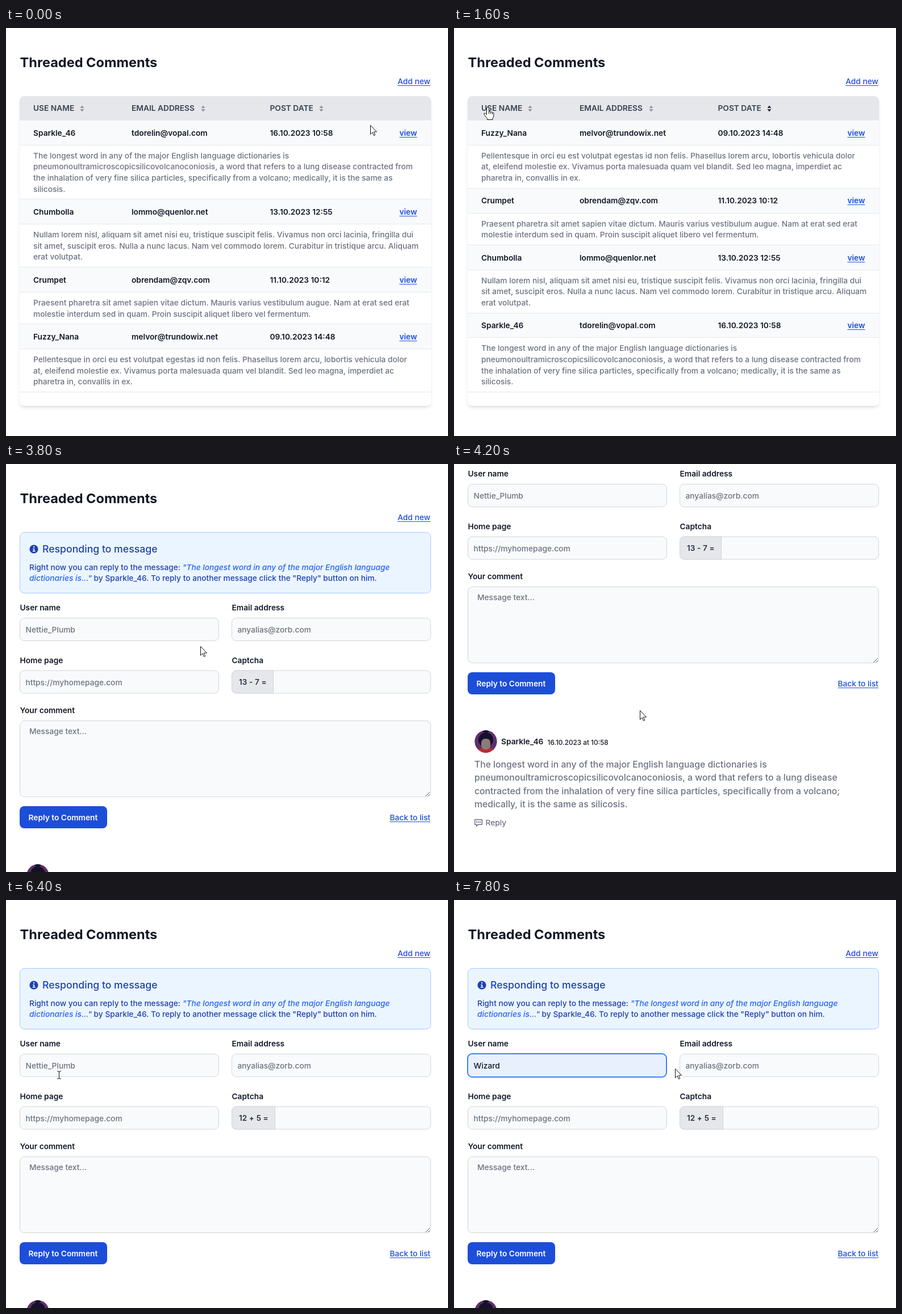
These frames come from a looping animation (778 px wide and 719 px high, 8000 ms). An HTML page with a canvas:

```html
<!DOCTYPE html>
<html lang="en">
<head>
<meta charset="utf-8">
<title>Threaded Comments</title>
<style>
html, body { margin: 0; width: 100%; height: 100%; overflow: hidden; background: #fff; }
canvas { display: block; }
</style>
</head>
<body>
<canvas id="stage" width="778" height="719"></canvas>
<script>
const ctx = document.getElementById('stage').getContext('2d');
const LOOP = 8000, STEP = 200;
const ZOOM = 0.982;              // page zoom applied to the type sizes
const LINE = 20 * ZOOM;
const INK = '#111827', GRAY = '#6b7280', RULE = '#e5e7eb', EDGE = '#d1d5db',
      PALE = '#f9fafb', LINK = '#1d4ed8', NAVY = '#1e40af';

const rows = [
  { user: 'Sparkle_46', mail: 'tdorelin@vopal.com', date: '16.10.2023 10:58', body: [
    'The longest word in any of the major English language dictionaries is',
    'pneumonoultramicroscopicsilicovolcanoconiosis, a word that refers to a lung disease contracted from',
    'the inhalation of very fine silica particles, specifically from a volcano; medically, it is the same as',
    'silicosis.'] },
  { user: 'Chumbolla', mail: 'lommo@quenlor.net', date: '13.10.2023 12:55', body: [
    'Nullam lorem nisl, aliquam sit amet nisi eu, tristique suscipit felis. Vivamus non orci lacinia, fringilla dui',
    'sit amet, suscipit eros. Nulla a nunc lacus. Nam vel commodo lorem. Curabitur in tristique arcu. Aliquam',
    'erat volutpat.'] },
  { user: 'Crumpet', mail: 'obrendam@zqv.com', date: '11.10.2023 10:12', body: [
    'Praesent pharetra sit amet sapien vitae dictum. Mauris varius vestibulum augue. Nam at erat sed erat',
    'molestie interdum sed in quam. Proin suscipit aliquet libero vel fermentum.'] },
  { user: 'Fuzzy_Nana', mail: 'melvor@trundowix.net', date: '09.10.2023 14:48', body: [
    'Pellentesque in orci eu est volutpat egestas id non felis. Phasellus lorem arcu, lobortis vehicula dolor',
    'at, eleifend molestie ex. Vivamus porta malesuada quam vel blandit. Sed leo magna, imperdiet ac',
    'pharetra in, convallis in ex.'] }
];

const thread = [
  'The longest word in any of the major English language dictionaries is',
  'pneumonoultramicroscopicsilicovolcanoconiosis, a word that refers to a lung disease',
  'contracted from the inhalation of very fine silica particles, specifically from a volcano;',
  'medically, it is the same as silicosis.'
];

// time, x, y, pointer shape
const path = [
  [0, 641, 171, 'arrow'], [400, 580, 150, 'hand'], [600, 558, 141, 'hand'], [1200, 560, 141, 'hand'],
  [1400, 330, 142, 'hand'], [1600, 59, 139, 'hand'], [1800, 27, 141, 'hand'], [2000, 75, 141, 'hand'],
  [2200, 132, 140, 'hand'], [2400, 134, 140, 'hand'], [2600, 410, 180, 'arrow'], [2800, 610, 184, 'arrow'],
  [3000, 708, 184, 'hand'], [3400, 700, 190, 'arrow'], [3600, 480, 280, 'arrow'], [3800, 342, 321, 'arrow'],
  [4200, 327, 434, 'arrow'], [4400, 210, 540, 'arrow'], [4600, 75, 630, 'hand'], [4800, 68, 632, 'hand'],
  [5200, 68, 630, 'arrow'], [5600, 82, 520, 'text'], [6000, 96, 376, 'text'], [6400, 93, 308, 'text'],
  [6600, 94, 296, 'text'], [6800, 95, 306, 'text'], [7000, 100, 340, 'arrow'], [7400, 105, 342, 'arrow'],
  [7600, 255, 318, 'arrow'], [7800, 389, 297, 'arrow'], [8000, 389, 297, 'arrow']
];

// start, end, x, y of each click mark
const clicks = [
  [800, 1200, 555, 140], [2400, 2800, 134, 140], [3200, 3400, 708, 185],
  [4800, 5200, 68, 632], [6600, 6800, 94, 294], [7200, 7400, 102, 341]
];

const shapes = {
  arrow: new Path2D('M0 0V15.8L3.6 12.4L6 18L8.3 17L5.9 11.5H11Z'),
  hand: new Path2D('M-2 2Q-2 0 0 0T2 2V8Q4.2 6.7 5 8.7Q7.2 7.6 8 9.7Q10.5 8.8 10.5 11.5V15Q10.3 18 8.5 19.5V22H-1V20L-6.2 13.6Q-7.6 10.6 -5 10.4L-2 13Z'),
  knuckles: new Path2D('M2 8V12M5 8.7V12M8 9.7V12.5'),
  text: new Path2D('M-3.5 -6.5H-1Q0 -6.5 0 -5.5Q0 -6.5 1 -6.5H3.5M0 -5.5V5.5M-3.5 6.5H-1Q0 6.5 0 5.5Q0 6.5 1 6.5H3.5'),
  bubble: new Path2D('M.7 .7H13.3V9.3H6.5L3.5 12.3V9.3H.7Z')
};

function setFont(size, weight, style = '') {
  ctx.font = `${style} ${weight} ${size * ZOOM}px Inter, sans-serif`;
}

// Draws a line of text and returns its width.
function text(str, x, y, { size = 14, weight = 500, color = INK, align = 'left', style } = {}) {
  setFont(size, weight, style);
  ctx.fillStyle = color;
  ctx.textAlign = align;
  ctx.fillText(str, x, Math.round(y));
  return ctx.measureText(str).width;
}

function link(str, right, y, weight = 500) {
  const w = text(str, right, y, { weight, color: LINK, align: 'right' });
  ctx.fillRect(right - w, Math.round(y) + 2, w, 1);
}

function box(x, y, w, h, r, fill, stroke, line = 1) {
  const d = stroke ? line / 2 : 0;
  ctx.beginPath();
  ctx.roundRect(x + d, y + d, w - 2 * d, h - 2 * d, r);
  ctx.fillStyle = fill;
  ctx.fill();
  if (!stroke) return;
  ctx.lineWidth = line;
  ctx.strokeStyle = stroke;
  ctx.stroke();
}

function disc(x, y, r, fill) {
  ctx.beginPath();
  ctx.arc(x, y, r, 0, 7);
  ctx.fillStyle = fill;
  ctx.fill();
}

function poly(fill, ...pts) {
  ctx.beginPath();
  pts.forEach(([x, y]) => ctx.lineTo(x, y));
  ctx.fillStyle = fill;
  ctx.fill();
}

function shadow(x, y, w, h, dy, blur, spread) {
  ctx.save();
  ctx.shadowColor = 'rgba(0,0,0,.1)';
  ctx.shadowOffsetY = dy;
  ctx.shadowBlur = blur;
  box(x - spread, y - spread, w + 2 * spread, h + 2 * spread, 7, '#fff');
  ctx.restore();
}

function sortIcon(x, active) {
  const c = active ? '#1f2937' : '#8f949e';
  poly(c, [x - 3.5, 141], [x, 136.5], [x + 3.5, 141]);
  poly(c, [x - 3.5, 143], [x, 147.5], [x + 3.5, 143]);
}

function heading() {
  text('Threaded Comments', 24.5, 69, { size: 24, weight: 700 });
  link('Add new', 747, 99);
}

function table(order, active) {
  shadow(24, 120, 724, 546, 4, 6, -1);
  shadow(24, 120, 724, 546, 2, 4, -2);
  ctx.save();
  ctx.beginPath();
  ctx.roundRect(24, 120, 724, 546, 8);
  ctx.clip();
  box(24, 120, 724, 546, 0, '#fff');
  box(24, 120, 724, 43, 0, RULE);
  [['USE NAME', 48, 134], ['EMAIL ADDRESS', 221, 347], ['POST DATE', 464.5, 555]].forEach(([name, x, icon], i) => {
    text(name, x, 146, { weight: 600, color: '#374151' });
    sortIcon(icon, i === active);
  });
  let y = 163;
  for (const i of order) {
    const { user, mail, date, body } = rows[i];
    const mid = y + 43.8, end = mid + 17 + body.length * LINE;
    const top = Math.round(y), split = Math.round(mid);
    box(24, top, 724, split - top, 0, PALE);
    [[user, 48], [mail, 221], [date, 464.5]].forEach(([s, x]) => text(s, x, y + 26.7, { weight: 600 }));
    link('view', 723.5, y + 26.7, 600);
    body.forEach((s, n) => text(s, 48, mid + 23 + n * LINE, { color: GRAY }));
    box(24, split - 1, 724, 1, 0, RULE);
    box(24, Math.round(end) - 1, 724, 1, 0, RULE);
    y = end;
  }
  ctx.restore();
}

function notice() {
  box(24, 120, 724, 108, 8, '#ebf5ff', '#a4cafe');
  disc(49, 150, 7.6, NAVY);
  ctx.fillStyle = '#fff';
  ctx.fillRect(48, 145, 2.2, 2.2);
  ctx.fillRect(47, 149, 3, 1.4);
  ctx.fillRect(48.5, 149, 1.6, 5);
  ctx.fillRect(46.8, 153, 5, 1.4);
  text('Responding to message', 64, 156, { size: 18, color: NAVY });
  const quote = { color: '#2563eb', style: 'italic' };
  const lead = text('Right now you can reply to the message: ', 41, 187, { color: NAVY });
  text('"The longest word in any of the major English language', 41 + lead, 187, quote);
  const tail = text('dictionaries is..."', 41, 206, quote);
  text(` by ${rows[0].user}. To reply to another message click the "Reply" button on him.`, 41 + tail, 206, { color: NAVY });
}

function field(label, hint, x, y, w = 351) {
  text(label, x + .5, y - 13, { weight: 600 });
  box(x, y, w, 41, 8, PALE, EDGE);
  text(hint, x + 10.5, y + 26, { color: GRAY });
}

function captcha(sum) {
  field('Captcha', '', 397, 363.5);
  setFont(14, 500);
  const w = Math.round(ctx.measureText(sum).width) + 25;
  box(397, 363.5, w, 41, [8, 0, 0, 8], RULE, EDGE);
  text(sum, 410, 389);
}

function avatar(x, y) {
  ctx.save();
  ctx.beginPath();
  ctx.arc(x, y, 19.7, 0, 7);
  ctx.clip();
  disc(x, y, 20, '#5f2f6c');
  box(x - 14, y + 12, 28, 10, 6, '#b92d2f');
  disc(x, y - 3, 13, '#15112a');
  box(x - 8, y - 5, 16, 19, 7, '#8d7b78');
  box(x - 5, y - 20, 10, 4, 2, '#15112a');
  ctx.restore();
}

function comment() {
  avatar(56, 725);
  text(rows[0].user, 83, 730, { weight: 600 });
  text('16.10.2023 at 10:58', 164.5, 731, { size: 12 });
  thread.forEach((s, n) => text(s, 36, 770.5 + n * 24 * ZOOM, { size: 16, color: GRAY }));
  ctx.save();
  ctx.translate(36, 862);
  ctx.lineWidth = 1.4;
  ctx.strokeStyle = ctx.fillStyle = GRAY;
  ctx.stroke(shapes.bubble);
  for (const x of [3, 6, 9]) ctx.fillRect(x, 4, 2, 2);
  ctx.restore();
  text('Reply', 55.5, 873, { color: GRAY });
}

function form(t) {
  const scroll = t < 4000 || t >= 5200 ? 0 : t < 4200 ? 118 : 236;
  ctx.save();
  ctx.translate(0, -scroll);
  heading();
  notice();
  field('User name', t < 7000 ? 'Nettie_Plumb' : '', 24, 271);
  field('Email address', 'anyalias@zorb.com', 397, 271);
  field('Home page', 'https://myhomepage.com', 24, 363.5);
  captcha(t < 5200 ? '13 - 7 =' : '12 + 5 =');
  text('Your comment', 24.5, 439, { weight: 600 });
  box(24, 452, 724, 135, 8, PALE, EDGE);
  text('Message text...', 41, 475.5, { color: GRAY });
  ctx.beginPath();
  ctx.moveTo(738.5, 585.5); ctx.lineTo(746, 578);
  ctx.moveTo(743, 585.5); ctx.lineTo(746, 582.5);
  ctx.strokeStyle = '#555';
  ctx.lineWidth = 1;
  ctx.stroke();
  box(24, 603, 154, 39, 8, LINK);
  text('Reply to Comment', 39.5, 628, { weight: 600, color: '#fff' });
  link('Back to list', 747, 628);
  comment();
  if (t >= 6600) autofill(t);
  ctx.restore();
}

function autofill(t) {
  const filled = t >= 7000;
  box(23, 270, 352, 43, 8, filled ? '#e8f0fe' : PALE, '#3b82f6', 2);
  text(filled ? 'Wizard' : 'Nettie_Plumb', 34.5, 297, { color: filled ? INK : GRAY });
  if (t < 6800 || t >= 7400) return;
  box(24, 315, 351, 51, 4, '#fff', '#dadce0');
  if (filled) box(25, 324, 349, 33, 0, '#eeeeee');
  text('Wizard', 34.5, 345);
}

function clickMark(t) {
  for (const [from, to, x, y] of clicks) {
    if (t < from || t >= to) continue;
    disc(x, y, 13, 'rgba(239,68,68,.42)');
    ctx.beginPath();
    ctx.arc(x, y, 12.6, 0, 7);
    ctx.strokeStyle = '#ef5555';
    ctx.lineWidth = 1.5;
    ctx.setLineDash([5, 2]);
    ctx.stroke();
    ctx.setLineDash([]);
  }
}

function pointer(t) {
  const i = path.findIndex((p, n) => t >= p[0] && t < path[n + 1][0]);
  const [t0, x0, y0, shape] = path[i], [t1, x1, y1] = path[i + 1];
  const k = (t - t0) / (t1 - t0);
  ctx.save();
  ctx.translate(Math.round(x0 + (x1 - x0) * k) + .5, Math.round(y0 + (y1 - y0) * k) + .5);
  ctx.lineWidth = 1;
  ctx.strokeStyle = '#111';
  ctx.fillStyle = '#fff';
  if (shape !== 'text') ctx.fill(shapes[shape]);
  ctx.stroke(shapes[shape]);
  if (shape === 'hand') ctx.stroke(shapes.knuckles);
  ctx.restore();
}

function draw(now) {
  const t = Math.floor((now % LOOP) / STEP) * STEP;
  ctx.fillStyle = '#fff';
  ctx.fillRect(0, 0, 778, 719);
  if (t < 3400) {
    heading();
    if (t < 1000) table([0, 1, 2, 3], -1);
    else if (t < 2600) table([3, 2, 1, 0], 2);
    else table([0, 3, 2, 1], 0);
  } else form(t);
  clickMark(t);
  pointer(t);
}

let start;
function tick(now) {
  start ??= now;
  draw(now - start);
  requestAnimationFrame(tick);
}
draw(0);
requestAnimationFrame(tick);
</script>
</body>
</html>
```
